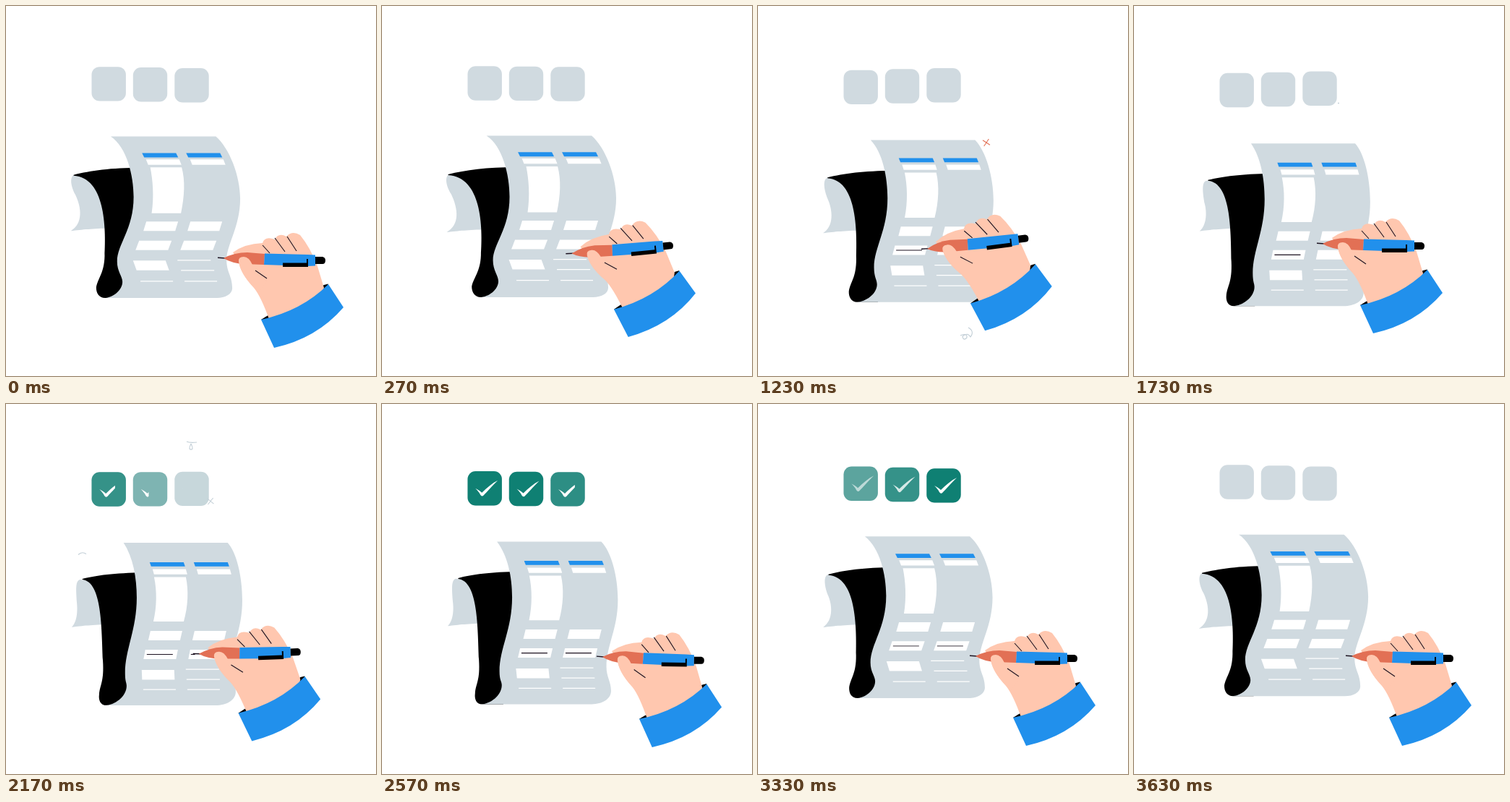
An HTML page with a canvas that plays this animation: 512 by 512 pixels, repeating every 3670 ms.

```html
<!DOCTYPE html>
<html lang="en">
<head>
<meta charset="utf-8">
<title>Signing a form</title>
<style>
  html, body { margin: 0; height: 100%; overflow: hidden; background: #fff; }
  canvas { display: block; width: 100vw; height: 100vh; }
</style>
</head>
<body>
<canvas width="512" height="512"></canvas>
<script>
const ctx = document.querySelector('canvas').getContext('2d');
const LOOP = 3670;
const GREY = '#d0dae0', BLUE = '#2190ec', RED = '#e27055', SKIN = '#ffc7af', TEAL = '#0f8073', MIST = '#c3cfd7';

const mix = (a, b, k) => a + (b - a) * k;
const ramp = (t, from, to) => Math.min(1, Math.max(0, (t - from) / (to - from)));
const ease = k => k * k * (3 - 2 * k);
// Swings 0 -> 1 -> 0 once per loop, lowest at `start`
const swing = (t, start) => (1 - Math.cos(2 * Math.PI * (t - start) / LOOP)) / 2;

function fill(path, color) {
  ctx.fillStyle = color;
  ctx.fill(new Path2D(path));
}
function line(path, color, width = 1.1) {
  ctx.strokeStyle = color;
  ctx.lineWidth = width;
  ctx.stroke(new Path2D(path));
}
function placed(x, y, degrees, draw) {
  ctx.save();
  ctx.translate(x, y);
  ctx.rotate(degrees * Math.PI / 180);
  draw();
  ctx.restore();
}
// Blends two paths of the same form: x by u, y by v
function morph(a, b, u, v) {
  const target = b.match(/[\d.]+/g);
  let i = 0;
  return a.replace(/[\d.]+/g, n => mix(+n, +target[i], i++ % 2 ? v : u));
}

const SHEET = [
  'M144.5 179.5 C167 194 176.5 234 176.5 264 C176.5 309 153.5 329 153.5 352 C153.5 366 161 373 161 381 C161 392 148 403 135 403 L292 403 C303 403 313 398 313 390 C313 372 305 368 305 350 C305 330 324 305 324 266 C324 235 309 196 290 179.5Z',
  'M163 192 C176 212 181 240 181 268 C181 312 165 340 165 372 C165 385 167 385 167 390 C167 405 150 417 137 417 L290 417 C305 417 318 410 318 398 C318 385 312 380 312 365 C312 335 327 312 327 272 C327 238 319 205 307 192Z'];
const INSIDE = [
  'M91 233 C115 227 145 223 185 223 L185 300 L165 370 L165 403 L137 403 C128 403 124 396 124 388 C127 375 136 368 137 345 C140 305 138 237 91 234Z',
  'M106 242 C125 237 150 234 190 233 L190 300 L168 375 L168 417 L139 417 C130 417 128 409 129 402 C130 388 136 385 134 355 C132 310 133 246 106 243Z'];
const PHOTO = [
  'M199.5 222 C203 240 205 262 201.5 285.5 L242 285.5 C247 262 248 240 243 222Z',
  'M205 239.5 C209 258 209 280 204 301 L246 301 C252 280 253 258 249 239.5Z'];

// x, y, slant at both ends of the swing; width, height, colour, columns
const CELLS = [
  [188, 202.3, 3, 199, 219, 2, 47, 5.8, BLUE, [0, 61]],
  [193.5, 211, 3, 203, 228.5, 2, 46, 7.3, '#fff', [0, 61]],
  [194, 297, -4, 200, 314, -3, 44, 13, '#fff', [0, 61]],
  [184, 323.5, -5, 193, 340, -2.5, 45, 13, '#fff', [0, 62]],
  [175.5, 351, 5, 188, 368, .5, 45, 13.5, '#fff', [0]],
  [176, 350, 0, 188, 366.5, 0, 46, 1.2, '#fff', [61]],
  [181, 364, 0, 189, 380.5, 0, 46, 1.2, '#fff', [61]],
  [186, 379, 0, 190, 394.5, 0, 45, 1.2, '#fff', [0, 61]]];

function drawPaper(t) {
  const u = swing(t, 180), v = swing(t, 330), f = swing(t, 500);
  const fold = mix(88, 97.5, f), foldY = mix(233, 243, v);
  const tip = 315 - 8 * swing(t, 900);
  fill(`M${fold + 5} ${foldY} C${fold - 2} ${foldY + 2} ${fold} ${foldY + 16} ${mix(95.5, 98, f)} ${mix(260, 274, v)}
    C${mix(106, 98, f)} ${tip - 32} ${mix(108, 101, f)} ${tip - 10} ${mix(89.5, 91, f)} ${tip}
    C107 ${tip - 2} 118 ${tip - 3} 145 ${tip - 4} L145 ${foldY + 6}Z`, GREY);
  fill(morph(...INSIDE, f, v), '#000');
  fill(morph(...SHEET, u, v), GREY);
  fill(morph(...PHOTO, u, v), '#fff');
  for (const [ax, ay, as, bx, by, bs, w, h, color, columns] of CELLS)
    for (const dx of columns) {
      const x = mix(ax, bx, u) + dx, y = mix(ay, by, v), slant = mix(as, bs, u);
      fill(`M${x} ${y}h${w}l${slant} ${h}h${-w}Z`, color);
    }
  ctx.globalAlpha = 1 - ramp(t, 3250, 3500);
  const x = mix(185, 195, u), y = mix(330, 346.5, v);
  [[0, 640, 1070], [61, 2060, 2500]].forEach(([dx, from, to]) => {
    const k = ease(ramp(t, from, to));
    if (k) line(`M${x + dx} ${y}h${36 * k}`, '#1c1220');
  });
  ctx.globalAlpha = 1;
}

function drawBoxes(t) {
  [142.2, 199.5, 257].forEach((x, i) => {
    const y = 107 + 11 * swing(t, 330 + 145 * i);
    const start = 1770 + 190 * i;
    const on = ramp(t, start, start + 500), tick = ramp(t, start, start + 600);
    const off = 1 - ramp(t, 3230 + 50 * i, 3480 + 50 * i);
    placed(x, y, 0, () => {
      const box = color => {
        ctx.fillStyle = color;
        ctx.beginPath();
        ctx.roundRect(-23.7, -23.7, 47.4, 47.4, 11);
        ctx.fill();
      };
      box(GREY);
      if (!on) return;
      ctx.globalAlpha = on * off;
      box(TEAL);
      ctx.globalAlpha = off;
      ctx.beginPath();
      ctx.rect(-14, -20, 34 * tick, 40);
      ctx.clip();
      fill('M-13 0C-9 2 -6 4 -4 6C3 -1 10 -7 18 -11C10 -3 2 6 -2 10Q-4 12 -6 9C-8 5 -10 3 -13 0Z', '#fff');
    });
  });
}

// time, pen tip x, y, hand angle
const POSES = [
  [60, 293, 348, 0], [570, 189, 333, -16], [650, 190, 333, -16], [1070, 224, 335.5, -8], [1230, 226, 336, -7.3],
  [1730, 253, 328, 0], [2060, 252, 344.5, -3], [2520, 298, 349, 1], [2690, 293, 348, 0]];

function poseAt(t) {
  const next = POSES.findIndex(p => p[0] > t);
  if (next < 1) return POSES[0].slice(1);
  const a = POSES[next - 1], b = POSES[next], k = ease(ramp(t, a[0], b[0]));
  return [1, 2, 3].map(i => mix(a[i], b[i], k));
}

function drawHand(t) {
  const [x, y, angle] = poseAt(t);
  // The cuff turns less than the hand
  const sleeve = draw => placed(389, 401, -.55 * angle, () => { ctx.translate(-389, -401); draw(); });
  placed(x, y, angle, () => {
    ctx.translate(-293, -348);
    sleeve(() => fill('M353 434L361 429L440 386L446 384.5L440 400L365 438Z', '#000'));
    fill('M314 341Q330 329 355 328Q358 318 372 323Q377 313 388 319Q396 310 407 317Q421 334 431 360L440 390L432 420L365 436Q353 402 343 390Q324 370 322 353Z', SKIN);
    line('M355 331L365 342M372 321L386 340M389 319L402 339', '#1c1220');
    line('M293 348.3L304 349', '#1c1220', 1.4);
    fill('M301 349Q316 341 334 341L358 343L357 358L330 357Q312 356 301 349Z', RED);
    fill('M358 342.5L417 344L428 344.5L428 359.5L417 360L357 358Z', BLUE);
    fill('M383 355.5H416V350H418V361H383Z', '#000');
    fill('M428 347L438 347Q442 348 442 352Q442 357 438 357L428 357Z', '#000');
    fill('M322 354Q321 347 329 347Q336 347 341 358L349 368L362 378L350 396Q325 373 322 354Z', SKIN);
    line('M345 366L361 377', '#1c1220');
    sleeve(() => fill('M353 434Q409 422 446 385L467 417Q430 460 371 473Z', BLUE));
  });
}

const cross = size => `M${-size} 0H${size}M0 ${-size}V${size}`;
const star = (color, size, turn) => k => placed(0, 0, turn + 40 * k, () => line(cross(size * Math.sin(Math.PI * k)), color));
const doodle = path => () => line(path, MIST);
function dots() {
  ctx.fillStyle = MIST;
  for (let i = 0; i < 24; i++) ctx.fillRect(-6 + i % 6 * 2.2, -4 + Math.floor(i / 6) * 2.2, .9, .9);
}
const ARC = 'M-4 4Q-2 -1 4 -4', LOOPS = 'M-8 2Q2 -2 1 5Q-4 10 -5 3Q2 -3 6 4Q12 -4 3 -9';

// x, y, from, to, drawing
const SPARKS = [
  [106.5, 88.5, 530, 740, star(BLUE, 4.5, 0)],
  [106, 88.5, 2920, 3140, star(BLUE, 6, 20)],
  [316, 189, 1090, 1390, star(RED, 6, 15)],
  [316, 189, 2900, 3160, star(RED, 5, -20)],
  [283, 134.5, 1690, 2500, star(MIST, 6, 15)],
  [98, 220, 500, 750, doodle(ARC)],
  [105, 207.5, 2060, 2300, doodle('M-5 1Q0 -4 6 0')],
  [80, 351, 450, 750, dots],
  [288, 454, 1040, 1400, doodle(LOOPS)],
  [291, 452, 2900, 3160, doodle('M-1 -7Q9 0 1 6')],
  [256, 56, 2060, 2400, doodle('M-6 -4Q-2 -2 8 -3M0 -1Q-4 7 0 7Q4 7 0 -1')]];

function drawSparks(t) {
  for (const [x, y, from, to, draw] of SPARKS)
    if (t > from && t < to) placed(x, y, 0, () => draw(ramp(t, from, to)));
}

function frame() {
  const t = performance.now() % LOOP;
  ctx.fillStyle = '#fff';
  ctx.fillRect(0, 0, 512, 512);
  drawPaper(t);
  drawBoxes(t);
  drawSparks(t);
  drawHand(t);
  requestAnimationFrame(frame);
}
frame();
</script>
</body>
</html>
```
